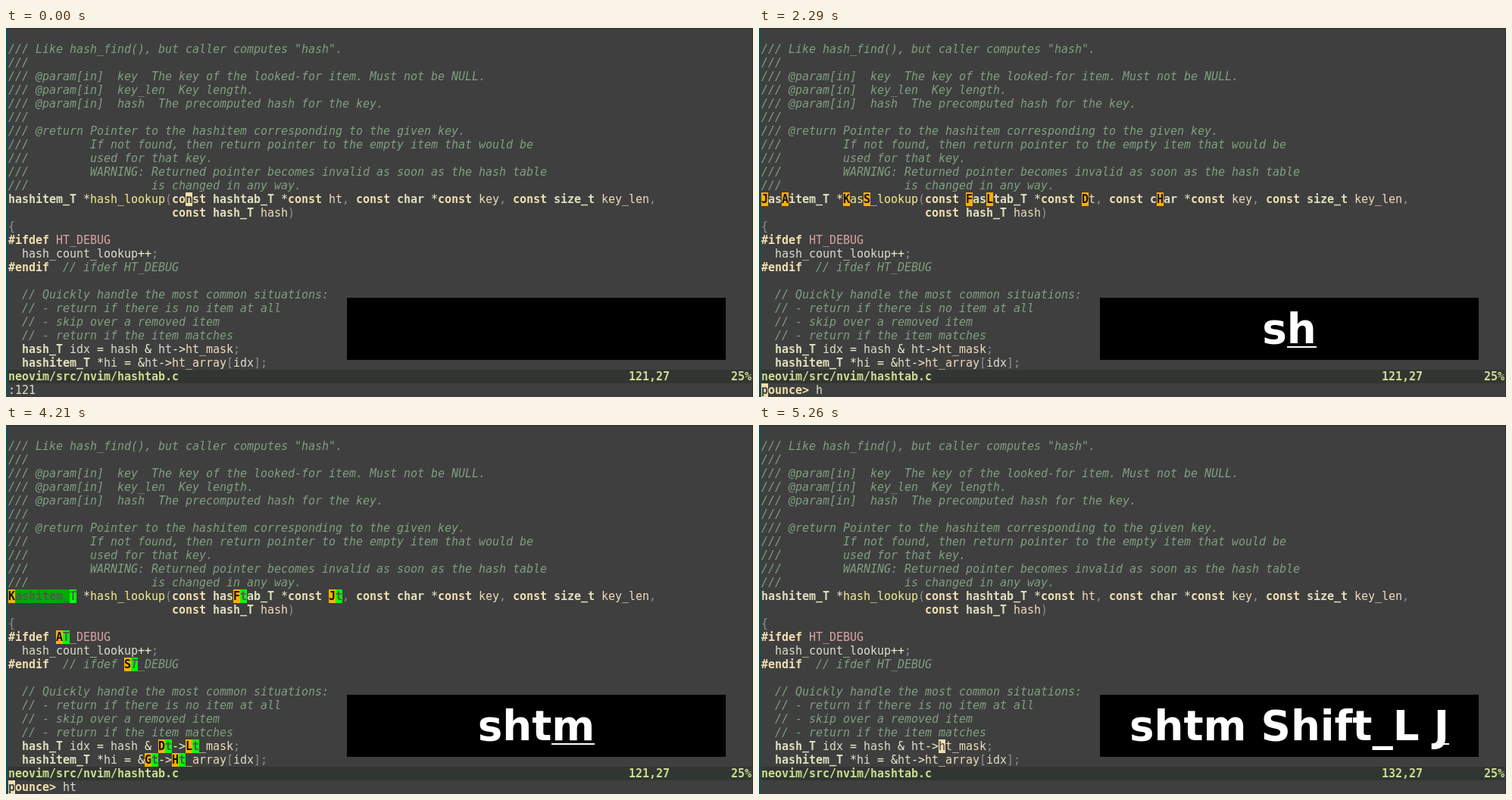
An HTML page with a canvas for the animation above (6680 ms loop, 986 by 487 pixels).

```html
<!DOCTYPE html>
<html lang="en">
<head>
<meta charset="utf-8">
<title>Fuzzy jump in an editor</title>
<style>
html, body { margin: 0; width: 100%; height: 100%; overflow: hidden; background: #3f3f3f; }
canvas { display: block; width: 986px; height: 487px; }
</style>
</head>
<body>
<canvas id="stage" width="986" height="487"></canvas>
<script>
const ctx = document.getElementById('stage').getContext('2d');
const LOOP = 6680;
const CELL_W = 9, CELL_H = 18, LEFT = 3, TOP = 1;
const BG = '#3f3f3f', FG = '#dcdccc', CREAM = '#f0dfaf';

const CODE = `
/// Like hash_find(), but caller computes "hash".
///
/// @param[in]  key  The key of the looked-for item. Must not be NULL.
/// @param[in]  key_len  Key length.
/// @param[in]  hash  The precomputed hash for the key.
///
/// @return Pointer to the hashitem corresponding to the given key.
///         If not found, then return pointer to the empty item that would be
///         used for that key.
///         WARNING: Returned pointer becomes invalid as soon as the hash table
///                  is changed in any way.
hashitem_T *hash_lookup(const hashtab_T *const ht, const char *const key, const size_t key_len,
                        const hash_T hash)
{
#ifdef HT_DEBUG
  hash_count_lookup++;
#endif  // ifdef HT_DEBUG

  // Quickly handle the most common situations:
  // - return if there is no item at all
  // - skip over a removed item
  // - return if the item matches
  hash_T idx = hash & ht->ht_mask;
  hashitem_T *hi = &ht->ht_array[idx];`.split('\n');

// Syntax rules in order of priority: pattern, colour, font style
const SYNTAX = [
  [/\/\/.*/y, '#7f9f7f', 'italic'],
  [/#\w+|const\b/y, CREAM, 'bold'],
  [/char\b|\w+_[tT]\b/y, '#dfdfbf', 'bold'],
  [/hash_lookup\b/y, '#efef8f', ''],
  [/HT_DEBUG/y, '#dca3a3', ''],
  [/\w+(?=[,)])|ht_\w+/y, '#efdcbc', ''],
  [/[()[\]{},;]/y, '#8f8f8f', ''],
  [/[-+*&=>]+/y, '#f0efd0', ''],
  [/\w+|\s+/y, FG, ''],
];

function tokenize(line) {
  const cells = [];
  while (cells.length < line.length) {
    for (const [pattern, color, style] of SYNTAX) {
      pattern.lastIndex = cells.length;
      const match = pattern.exec(line);
      if (!match) continue;
      for (const char of match[0]) cells.push({ char, color, style });
      break;
    }
  }
  return cells;
}

const ROWS = CODE.map(tokenize);

// Marks are [row, column, pattern]: letter = jump label, + = match, . = gap
const VIEWS = [
  { at: 0, command: ':121', cursor: [12, 26] },
  { at: 1280, query: '' },
  { at: 2290, query: 'h', marks: [
    [12, 0, 'J'], [12, 3, 'A'], [12, 12, 'K'], [12, 15, 'S'],
    [12, 30, 'F'], [12, 33, 'L'], [12, 47, 'D'], [12, 58, 'H']] },
  { at: 3210, query: 'ht', marks: [
    [12, 0, 'K........+'], [12, 33, 'F+'], [12, 47, 'J+'], [15, 7, 'A+'], [17, 17, 'S+'],
    [23, 22, 'D+'], [23, 26, 'L+'], [24, 20, 'G+'], [24, 24, 'H+']] },
  { at: 4250, query: 'htm', marks: [
    [12, 0, 'K....+.+'], [19, 13, 'F......+...+'], [23, 26, 'J+.+']] },
  { at: 5260, command: '', cursor: [23, 26], position: '132,27' },
];

const KEYS = [
  { at: 0, before: '', last: '' },
  { at: 1240, before: '', last: 's' },
  { at: 2250, before: 's', last: 'h' },
  { at: 3170, before: 'sh', last: 't' },
  { at: 4210, before: 'sht', last: 'm' },
  { at: 5000, before: 'shtm ', last: 'Shift_L' },
  { at: 5220, before: 'shtm Shift_L ', last: 'J' },
];

const current = (list, time) => list.filter(item => item.at <= time).pop();

function rect(x, y, w, h, color) {
  ctx.fillStyle = color;
  ctx.fillRect(x, y, w, h);
}

function drawCell(row, col, { char, color, style }, background) {
  const x = LEFT + col * CELL_W, y = TOP + row * CELL_H;
  if (background) rect(x, y, CELL_W, CELL_H, background);
  ctx.font = `${style} 15px "DejaVu Sans Mono", monospace`;
  ctx.fillStyle = color;
  ctx.fillText(char, x, y + 14);
}

function drawText(row, col, text, color, style) {
  [...text].forEach((char, i) => drawCell(row, col + i, { char, color, style }));
}

function drawMarkedCell(row, col, mark) {
  const cell = ROWS[row][col];
  if (mark === '+' || mark === '.') {
    const style = cell.style === 'italic' ? 'italic bold' : 'bold';
    drawCell(row, col, { char: cell.char, color: '#555555', style }, mark === '+' ? '#00ff00' : '#00aa00');
  } else {
    drawCell(row, col, { char: mark, color: '#111111', style: 'bold' }, '#ffaf00');
  }
}

function drawEditor({ command, query, cursor, marks = [], position = '121,27' }) {
  const special = new Map();
  for (const [row, col, pattern] of marks) {
    [...pattern].forEach((mark, i) => special.set(`${row},${col + i}`, mark));
  }
  ROWS.forEach((cells, row) => cells.forEach((cell, col) => {
    const mark = special.get(`${row},${col}`);
    if (mark) drawMarkedCell(row, col, mark);
    else if (cursor && cursor[0] === row && cursor[1] === col) {
      drawCell(row, col, { ...cell, color: BG }, CREAM);
    } else drawCell(row, col, cell);
  }));

  rect(LEFT, TOP + 25 * CELL_H, 109 * CELL_W, CELL_H, '#313633');
  drawText(25, 0, 'neovim/src/nvim/hashtab.c', '#ccdc90', 'bold');
  drawText(25, 91, position, '#ccdc90', 'bold');
  drawText(25, 106, '25%', '#ccdc90', 'bold');

  if (query === undefined) {
    drawText(26, 0, command, FG, '');
  } else {
    drawCell(26, 0, { char: 'p', color: BG, style: 'bold' }, CREAM);
    drawText(26, 1, 'ounce>', CREAM, 'bold');
    drawText(26, 8, query, FG, '');
  }
}

function drawKeys({ before, last }) {
  rect(450, 356, 500, 82, '#000');
  if (!last) return;
  ctx.font = 'bold 54.67px "DejaVu Sans", sans-serif';
  const total = ctx.measureText(before + last).width;
  const lastWidth = ctx.measureText(last).width;
  const x = 700 - total / 2;
  ctx.fillStyle = '#fff';
  ctx.fillText(before + last, x, 416);
  rect(Math.round(x + total - lastWidth), 420, Math.round(lastWidth), 2, '#fff');
}

function draw(time) {
  rect(0, 0, 986, 487, BG);
  rect(0, 0, 986, 1, '#2b2f2f');
  rect(985, 0, 1, 487, '#2b2f2f');
  rect(0, 0, 2, 487, '#075357');
  drawEditor(current(VIEWS, time));
  drawKeys(current(KEYS, time));
}

const start = performance.now();
function tick() {
  draw((performance.now() - start) % LOOP);
  requestAnimationFrame(tick);
}
tick();
</script>
</body>
</html>
```
